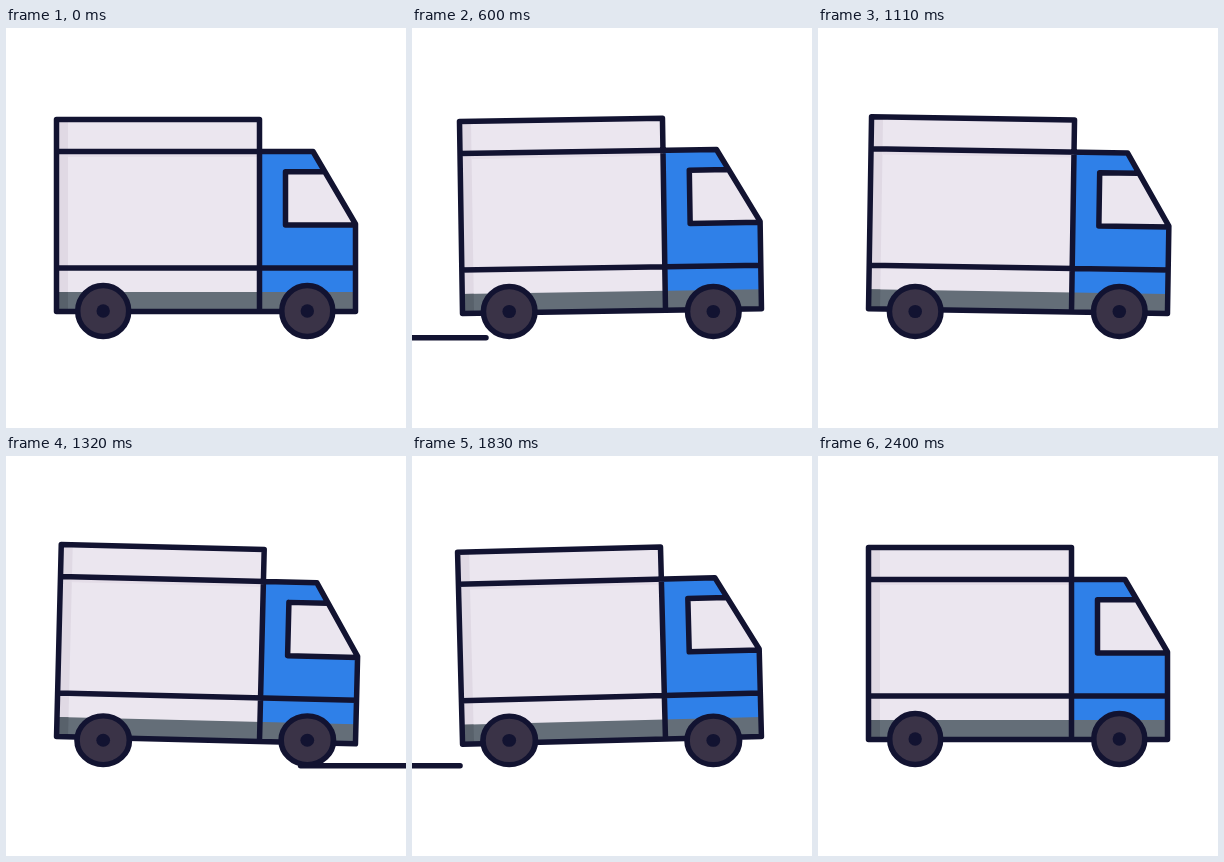
Animation of 400 by 400 pixels, one loop 4460 ms. Source, as an HTML page:

```html
<!DOCTYPE html>
<html lang="en">
<head>
<meta charset="utf-8">
<title>Delivery truck</title>
<style>
  html, body { margin: 0; width: 100%; height: 100%; overflow: hidden; background: #fff; }
  svg { display: block; width: 100%; height: 100%; }
  .ink { fill: none; stroke: #121331; stroke-width: 5.5; stroke-linecap: round; stroke-linejoin: round; }
</style>
</head>
<body>
<svg viewBox="0 0 400 400">
  <defs>
    <g id="wheel">
      <circle class="ink" cy="-28" r="25.5" style="fill:#3a3347"/>
      <circle cy="-28" r="6.7" fill="#121331"/>
    </g>
  </defs>
  <path id="road" class="ink"/>
  <g id="body">
    <path fill="#ebe6ef" d="M50.5 91.5H253.5V283.5H50.5Z"/>
    <path fill="#e0d9e4" d="M50.5 91.5H62V283.5H50.5Z"/>
    <path fill="#e4dde8" d="M62 123.5H253.5V129H62Z"/>
    <path fill="#2f80e8" d="M253.5 123.5H307L349.5 196V283.5H253.5Z"/>
    <path fill="#646e78" d="M50.5 264H349.5V283.5H50.5Z"/>
    <path fill="#58616b" d="M50.5 264H62V283.5H50.5Z"/>
    <path fill="#ebe6ef" d="M279.5 143.7H318.5L349.5 197H279.5Z"/>
    <path class="ink" d="M50.5 91.5H253.5V283.5H50.5Z M50.5 123.5H307L349.5 196V283.5H253.5 M50.5 240H349.5 M318 143.7H279.5V197H349.5"/>
  </g>
  <use id="rear" href="#wheel"/>
  <use id="front" href="#wheel"/>
</svg>
<script>
const LOOP = 4460, ACTIVE = 2400, STEP = 30, PASS = 1200, TILT = 1.5;
// time, share of the full tilt
const swing = [[0, 0], [240, 1], [750, -1], [1260, 1], [1800, -1], [2310, 0]];
const byId = id => document.getElementById(id);
const road = byId('road'), body = byId('body');
const wheels = [[byId('rear'), 97.2], [byId('front'), 301.3]];

const ease = p => (1 - Math.cos(Math.PI * p)) / 2;

function lean(t) {
  for (let i = 1; i < swing.length; i++) {
    const [t0, a] = swing[i - 1], [t1, b] = swing[i];
    if (t < t1) return a + (b - a) * ease((t - t0) / (t1 - t0));
  }
  return 0;
}

function drawRoad(t) {
  const p = t % PASS;
  const shown = t < ACTIVE && p > 0 && p < 720;
  road.style.display = shown ? '' : 'none';
  const x = 410 - 0.962 * p + 0.00036 * Math.max(0, p - 480) ** 2;
  road.setAttribute('d', `M${x} 309.7h236`);
}

function draw(t) {
  const u = lean(t), load = u * u;
  // the body hops up between the extremes of each swing
  const swaying = t > swing[1][0] && t < swing[4][0];
  const y = swaying ? 1.9 * load - 1 : 0.9 * load;
  body.setAttribute('transform', `translate(0 ${y}) rotate(${TILT * u} 200 283.5)`);
  for (const [el, x] of wheels) {
    el.setAttribute('transform', `translate(${x} 311) scale(${1 + 0.03 * load} ${1 - 0.05 * load})`);
  }
  drawRoad(t);
}

const start = performance.now();
function tick() {
  const t = (performance.now() - start) % LOOP;
  draw(Math.min(ACTIVE, Math.floor(t / STEP) * STEP));
  requestAnimationFrame(tick);
}
tick();
</script>
</body>
</html>
```
